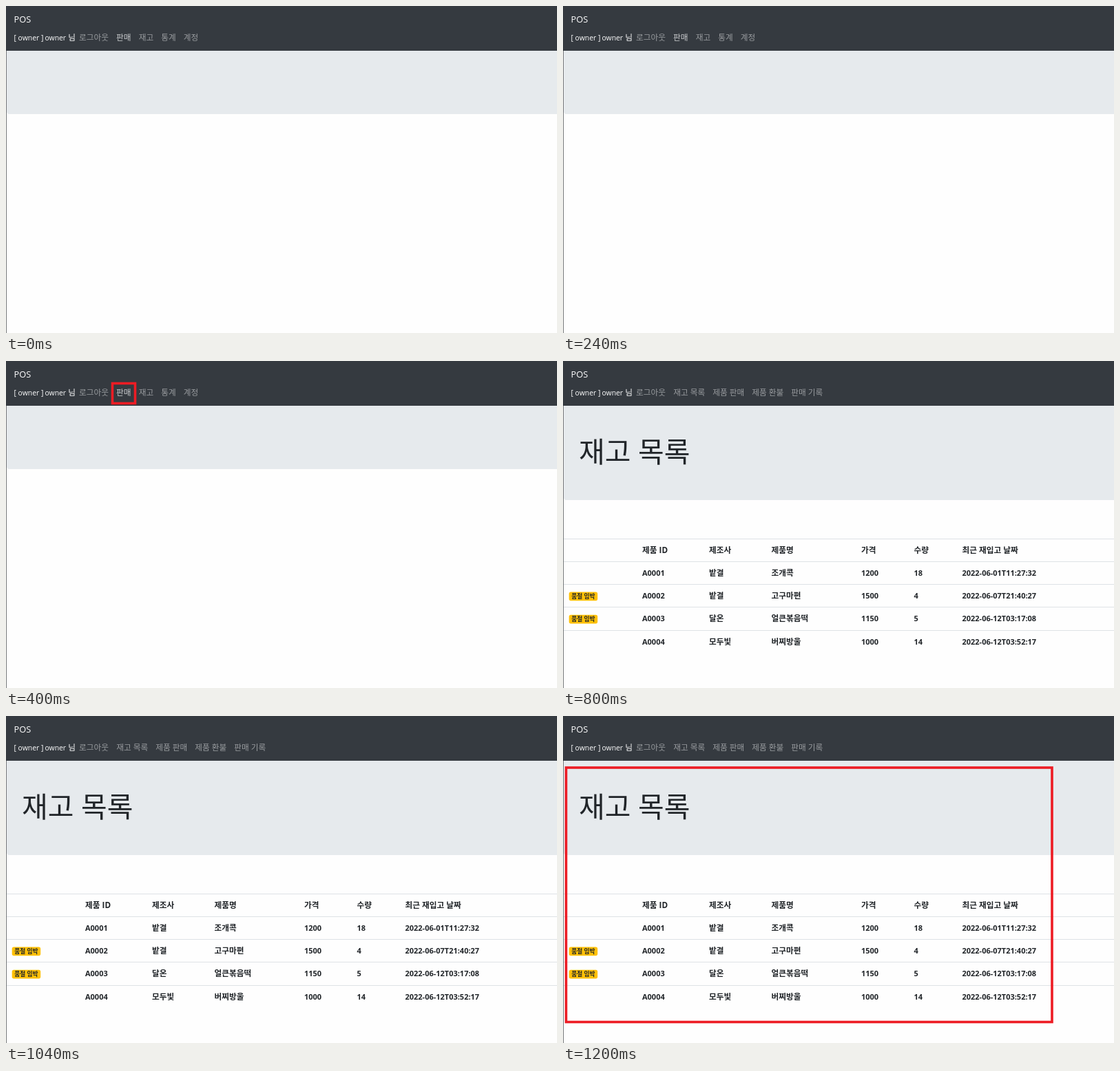
Write an HTML page that moves like this. It is 800 px wide and 475 px high and loops after 1.6 s.

```html
<!DOCTYPE html>
<html lang="ko">
<head>
<meta charset="utf-8">
<title>POS</title>
<style>
  html, body { margin: 0; width: 100%; height: 100%; overflow: hidden; background: #fefefe; }
  svg { display: block; width: 800px; height: 475px; }
  text { font-family: "Open Sans", "Noto Sans", "Noto Sans CJK KR", "Noto Sans CJK", sans-serif; white-space: pre; }
  .brand { font-size: 12.8px; fill: #fff; }
  .user { font-size: 10.4px; font-weight: 500; fill: #fff; }
  .nav { font-size: 11.7px; fill: #999c9f; }
  .nav.hover { fill: #cbcdcf; }
  .title { font-size: 41px; font-weight: 300; fill: #212529; }
  .cell { font-size: 11.7px; font-weight: 700; fill: #212529; }
  .cell.num { font-size: 11px; }
  .badge { font-size: 8.7px; font-weight: 700; fill: #212529; }
  .mark { fill: none; stroke: #ed1c24; stroke-width: 3.6; }
</style>
</head>
<body>
<svg id="stage" viewBox="0 0 800 475"></svg>
<script>
const LOOP = 1600;
const stage = document.getElementById('stage');

function add(parent, tag, attrs = {}, content = '') {
  const el = document.createElementNS('http://www.w3.org/2000/svg', tag);
  for (const key in attrs) el.setAttribute(key, attrs[key]);
  el.textContent = content;
  parent.append(el);
  return el;
}
const rect = (parent, x, y, width, height, attrs) =>
  add(parent, 'rect', { x, y, width, height, ...attrs });
const label = (parent, x, y, content, cls) =>
  add(parent, 'text', { x, y, class: cls }, content);

// Shows an element only between two times of the loop, with hard cuts.
function showBetween(el, from, to) {
  const steps = [0, from, to, LOOP].filter((t, i, all) => all.indexOf(t) === i);
  el.animate(steps.map(t => ({
    offset: t / LOOP,
    opacity: t >= from && t < to ? 1 : 0,
    easing: 'steps(1, end)'
  })), { duration: LOOP, iterations: Infinity });
}
function scene(from, to) {
  const group = add(stage, 'g');
  showBetween(group, from, to);
  return group;
}
function banner(parent, bottom) {
  add(parent, 'path', { d: `M1 65H800V${bottom}H5Q1 ${bottom} 1 ${bottom - 4}Z`, fill: '#e6eaed' });
}

// Shared frame of the page
rect(stage, 0, 0, 800, 475, { fill: '#fefefe' });
rect(stage, 0, 65, 1, 410, { fill: '#77797b' });
rect(stage, 0, 0, 800, 65, { fill: '#353a40' });
label(stage, 11.5, 24, 'POS', 'brand');
label(stage, 11.5, 49.5, '[ owner ]', 'user');
label(stage, 56.5, 49.5, 'owner', 'user');
label(stage, 90.3, 50, '님', 'nav').style.fill = '#fff';
label(stage, 106, 50, '로그아웃', 'nav');

// Home page
const home = scene(0, 800);
banner(home, 157);
[[160, '판매'], [192.7, '재고'], [225.2, '통계'], [257.7, '계정']].forEach(([x, name], i) =>
  label(home, x, 50, name, i ? 'nav' : 'nav hover'));

// Stock list
const list = scene(800, LOOP);
banner(list, 202);
['재고 목록', '제품 판매', '제품 환불', '판매 기록'].forEach((name, i) =>
  label(list, 160.2 + i * 57, 50, name, 'nav'));
label(list, 23, 146.5, '재고 목록', 'title');

const columns = [115, 212, 302.5, 433, 509.5, 579.5];
const rows = [
  ['제품 ID', '제조사', '제품명', '가격', '수량', '최근 재입고 날짜'],
  ['A0001', '밭결', '조개콕', '1200', '18', '2022-06-01T11:27:32'],
  ['A0002', '밭결', '고구마편', '1500', '4', '2022-06-07T21:40:27'],
  ['A0003', '달온', '얼큰볶음떡', '1150', '5', '2022-06-12T03:17:08'],
  ['A0004', '모두빛', '버찌방울', '1000', '14', '2022-06-12T03:52:17']
];
rows.forEach((row, r) => {
  const top = 258 + r * 33.15;
  rect(list, 1, Math.round(top), 799, 1, { fill: '#dee2e6' });
  row.forEach((value, c) =>
    label(list, columns[c], top + 21, value, /[가-힣]/.test(value) ? 'cell' : 'cell num'));
  if (r > 0 && Number(row[4]) < 10) {
    rect(list, 8.7, top + 11.3, 41.5, 12.7, { rx: 2.7, fill: '#ffc107' });
    label(list, 12.3, top + 20.8, '품절 임박', 'badge');
  }
});

// Highlight boxes
showBetween(rect(stage, 154.5, 32.5, 33, 29, { class: 'mark' }), 400, 800);
showBetween(rect(stage, 4.5, 75, 705.5, 369.5, { class: 'mark' }), 1200, LOOP);
</script>
</body>
</html>
```
